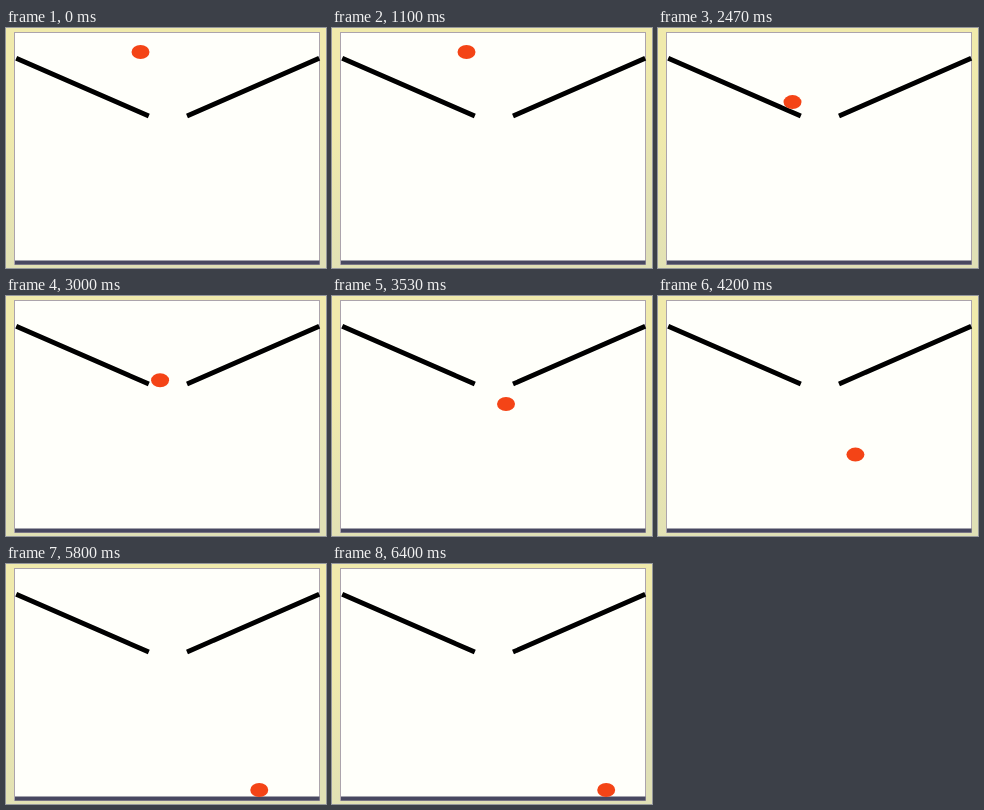
These frames come from a looping animation (320 px wide and 240 px high, 6.43 s). An HTML page:

```html
<!DOCTYPE html>
<html lang="en">
<head>
<meta charset="utf-8">
<title>Falling ball</title>
<style>
  html, body { margin: 0; width: 100%; height: 100%; overflow: hidden; background: #f0eaac; }
  svg { display: block; width: 100%; height: 100%; }
</style>
</head>
<body>
<svg viewBox="0 0 320 240">
  <defs>
    <linearGradient id="page" x2="0.3" y2="1">
      <stop offset="0.4" stop-color="#f0eaac"/>
      <stop offset="1" stop-color="#e0e0b6"/>
    </linearGradient>
  </defs>
  <rect width="320" height="240" fill="url(#page)"/>
  <rect x="8.5" y="4.5" width="305" height="232" fill="#fffffa" stroke="#aca4ac"/>
  <rect x="9" y="232.5" width="304.5" height="4" fill="#484860"/>
  <path d="M10.2 30.2 142.8 88M181 88 313.2 30.2" fill="none" stroke="#000" stroke-width="4.8"/>
  <ellipse id="ball" cx="134.5" cy="24" rx="9" ry="7" fill="#f44416"/>
</svg>
<script>
  const LOOP = 6430;
  const START = { x: 134.5, y: 24 };
  const FLOOR_Y = 226;
  const RELEASE = 1111, RAMP_HIT = 2480, FLOOR_HIT = 4822, RAMP_CLEAR = 3530;
  const FALL = 2.71e-5, FLIGHT = 2.55e-5;  // half gravity, px/ms²
  const REBOUND = 0.0265, RESTITUTION = 0.209;

  const ball = document.getElementById('ball');
  const drop = (s, speed, half) => speed * s + half * s * s;
  const contactY = START.y + drop(RAMP_HIT - RELEASE, 0, FALL);

  function ballX(t) {
    if (t < RAMP_HIT) return START.x;
    return t < RAMP_CLEAR
      ? START.x + 0.0376 * (t - RAMP_HIT)
      : 174 + 0.0349 * (t - RAMP_CLEAR);
  }

  function ballY(t) {
    if (t < RELEASE) return START.y;
    if (t < RAMP_HIT) return START.y + drop(t - RELEASE, 0, FALL);
    if (t < FLOOR_HIT) {
      return Math.min(FLOOR_Y, contactY + drop(t - RAMP_HIT, 0.0048, FLIGHT));
    }
    let s = t - FLOOR_HIT;
    for (let speed = REBOUND; speed > 0.001; speed *= RESTITUTION) {
      const airtime = speed / FALL;
      if (s < airtime) return FLOOR_Y + drop(s, -speed, FALL);
      s -= airtime;
    }
    return FLOOR_Y;
  }

  function render(t) {
    ball.setAttribute('cx', ballX(t).toFixed(2));
    ball.setAttribute('cy', ballY(t).toFixed(2));
  }

  const begin = performance.now();
  function tick() {
    render((performance.now() - begin) % LOOP);
    requestAnimationFrame(tick);
  }
  render(0);
  requestAnimationFrame(tick);
</script>
</body>
</html>
```
